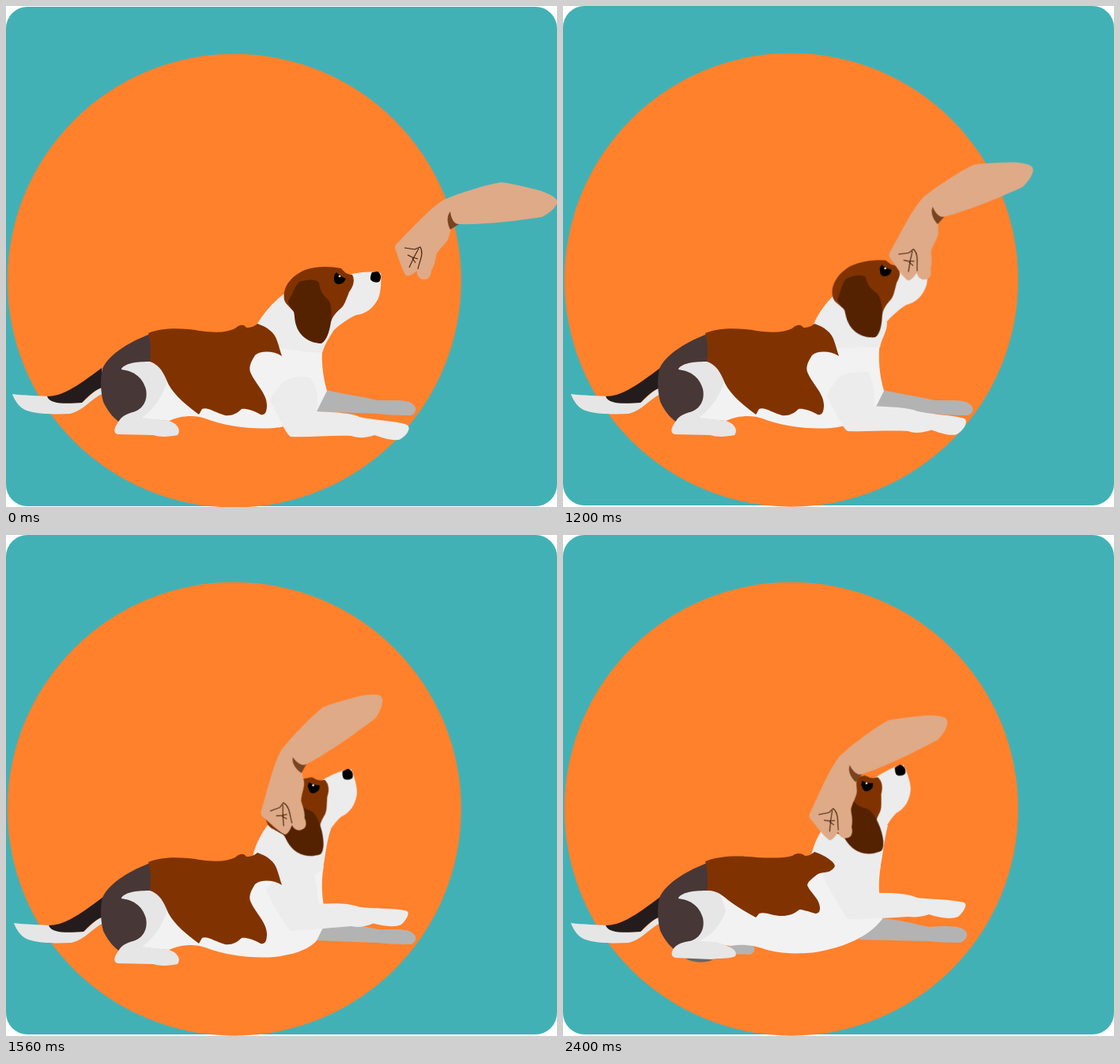
Recreate the animation shown at these times as an HTML page. Size 697 by 634 pixels, loop 3600 ms.

```html
<!DOCTYPE html>
<html lang="en">
<head>
<meta charset="utf-8">
<title>Dog training</title>
<style>
html, body { margin: 0; width: 100%; height: 100%; overflow: hidden; background: #fff; }
svg { display: block; width: 100%; height: 100%; }

/* Poses are held; steps(2) adds one halfway pose between two keyframes. */
.backdrop, .tail, .neck, .leg, .far-leg, .belly, .thigh, .coat, .head, .ear, .arm, .under, .bubble {
  animation: 3.6s step-end infinite;
}
.backdrop { animation-name: backdrop; }
.tail { animation-name: tail; }
.neck { animation-name: neck; }
.leg { animation-name: leg; }
.far-leg { animation-name: far-leg; }
.belly { animation-name: belly; }
.thigh { animation-name: thigh; }
.coat { animation-name: coat; }
.head { animation-name: head; transform-origin: 422px 345px; }
.ear { animation-name: ear; transform-origin: 385px 350px; }
.arm { animation-name: arm; transform-origin: 492px 303px; }
.under { animation-name: under; }
.bubble { animation-name: bubble; }

@keyframes backdrop {
  0% { transform: translate(0, 1px); }
  30%, 100% { transform: none; }
}
@keyframes tail {
  0% { transform: translate(-2px, 0); }
  30%, 100% { transform: none; }
}
@keyframes head {
  0% { transform: translate(0, 0) rotate(0deg); }
  30% { transform: translate(-14px, -10px) rotate(-7deg); }
  40% { transform: translate(-28px, -23px) rotate(-15deg); animation-timing-function: steps(2); }
  46.666%, 100% { transform: translate(-37px, -28px) rotate(-22deg); }
}
@keyframes ear {
  0% { transform: translate(0, 0) rotate(0deg); }
  40% { transform: translate(0, 0) rotate(0deg); animation-timing-function: steps(2); }
  46.666%, 100% { transform: translate(1px, 3px) rotate(-6deg); }
}
@keyframes arm {
  0% { transform: translate(0, 0) rotate(0deg); }
  30% { transform: translate(-43px, 0) rotate(-8deg); animation-timing-function: steps(2); }
  36.666% { transform: translate(-117px, 23px) rotate(-23.6deg); }
  40% { transform: translate(-159px, 47px) rotate(-38deg); animation-timing-function: steps(2); }
  46.666%, 100% { transform: translate(-181px, 52px) rotate(-19.5deg); }
}
@keyframes neck {
  0% { d: path("M316,405 C325,390 337,375 352,364 L414,411 C412,416 404,425 400,439 C380,438 360,435 345,432 L330,410Z"); }
  30% { d: path("M316,405 C322,390 332,376 343,366 L410,400 C410,413 403,420 401,432 C380,432 360,433 347,433 L330,410Z"); }
  40% {
    d: path("M311,405 C314,390 324,374 334,362 L411,377 C403,395 404,408 401,419 C380,423 360,425 346,428 L330,410Z");
    animation-timing-function: steps(2);
  }
  46.666%, 100% { d: path("M314,406 C317,392 322,382 328,372 L411,367 C405,390 404,415 399,430 C380,450 360,470 345,455 L329,430Z"); }
}
@keyframes leg {
  0% { d: path("M345,483 C350,472 365,468 385,470 C395,485 395,500 393,513 C420,514 440,516 447,520 C470,525 495,525 507,530 C514,534 506,545 497,549 C485,550 475,546 466,543 C455,547 445,547 437,544 C410,543 385,546 360,545 C353,540 345,520 334,500 C335,492 340,488 345,483Z"); }
  30% {
    d: path("M345,483 C350,472 365,468 385,470 C395,485 395,500 393,513 C420,514 440,516 447,520 C470,525 495,525 507,530 C514,534 506,545 497,549 C485,550 475,546 466,543 C455,547 445,547 437,544 C410,543 385,546 360,545 C353,540 345,520 334,500 C335,492 340,488 345,483Z");
    animation-timing-function: steps(2);
  }
  36.666% { d: path("M343,470 C350,457 365,456 387,457 C394,475 393,488 394,500 C420,500 440,502 447,505 C470,510 495,511 508,514 C514,518 506,532 497,536 C487,538 475,533 466,530 C455,533 445,536 437,532 C410,530 385,532 360,531 C353,527 345,508 334,488 C335,482 338,477 343,470Z"); }
  40% {
    d: path("M343,450 C348,438 365,440 381,440 C390,455 390,470 392,481 C410,479 430,478 444,482 C465,486 490,482 505,486 C512,488 506,497 500,503 C490,508 475,504 466,503 C455,508 445,511 437,507 C420,508 385,514 360,516 C353,513 340,490 329,468 C332,462 338,456 343,450Z");
    animation-timing-function: steps(2);
  }
  46.666%, 100% { d: path("M329,430 C345,420 365,420 399,420 C398,435 398,445 400,453 C415,453 435,453 448,459 C465,461 490,461 507,465 C513,467 506,478 500,483 C490,487 475,484 463,480 C455,483 445,484 437,483 C410,485 385,486 360,486 C353,475 340,455 329,432 C329,431 329,431 329,430Z"); }
}
@keyframes far-leg {
  0%, 40% { d: path("M406,486 C420,490 450,494 470,499 C490,499 505,498 512,502 C521,507 520,515 512,518 C490,518 480,517 470,516 L390,513Z"); }
  40% { animation-timing-function: steps(2); }
  46.666%, 100% { d: path("M404,485 C425,487 445,492 463,496 C480,495 495,494 505,498 C514,503 513,510 503,516 C490,516 475,515 460,514 L374,512Z"); }
}
@keyframes belly {
  0%, 40% { d: path("M183,450 L172,522 L206,525 C220,518 240,517 252,522 C280,533 325,538 352,532 C372,529 388,520 393,513 L406,487 C401,470 397,445 402,418 L300,425Z"); }
  40% { animation-timing-function: steps(2); }
  46.666%, 100% { d: path("M183,450 L172,514 L212,520 C228,517 245,520 258,525 C280,531 310,530 325,527 C355,521 385,510 404,486 L402,470 C400,460 398,440 402,418 L300,425Z"); }
}
@keyframes thigh {
  0%, 40% { d: path("M146,459 C152,451 168,450 183,450 C192,454 199,464 204,474 C200,490 188,510 172,521 L206,525 C217,528 222,537 217,543 C208,545 195,546 186,543 L141,542 C135,540 137,533 143,525 C148,517 155,516 163,513 C175,508 179,497 176,484 C171,468 160,462 146,461Z"); }
  40% { animation-timing-function: steps(2); }
  46.666%, 100% { d: path("M146,459 C152,451 168,450 183,450 C200,450 199,454 206,476 C200,490 192,505 172,514 L193,515 C212,520 222,526 218,533 C210,537 195,535 188,537 L142,535 C135,533 137,525 143,520 C148,516 155,515 163,513 C175,508 179,497 176,484 C171,468 160,462 146,461Z"); }
}
@keyframes coat {
  0%, 40% { d: path("M180,414 C200,406 225,408 245,411 C265,414 280,413 290,408 C296,402 302,403 304,407 C310,407 315,405 318,402 C330,406 340,413 343,424 C346,432 347,438 349,443 C338,436 322,436 315,442 C310,450 307,456 309,463 C315,478 330,490 330,505 C330,515 327,518 322,517 C312,511 302,509 298,510 C292,516 285,519 277,518 C265,515 255,507 248,510 L244,517 C222,501 208,487 203,473 C197,459 191,453 182,450 C184,438 183,425 180,414Z"); }
  40% { animation-timing-function: steps(2); }
  46.666%, 100% { d: path("M180,413 C200,405 225,406 245,408 C265,409 280,409 290,406 C296,401 303,403 306,406 C311,406 315,404 318,401 C328,404 338,410 342,415 C345,419 344,420 341,423 C335,429 328,425 321,430 C314,436 310,438 309,443 C312,452 325,460 325,472 C325,478 322,479 319,479 C310,476 302,474 299,474 C292,480 285,482 277,482 C265,482 255,476 248,479 L244,484 C228,475 214,467 204,458 C195,451 190,450 182,450 C184,438 183,425 180,413Z"); }
}
@keyframes under {
  0% { visibility: hidden; }
  46.666%, 100% { visibility: visible; }
}
@keyframes bubble {
  0% { visibility: hidden; }
  46.666% { visibility: visible; }
  66.666%, 100% { visibility: hidden; }
}
</style>
</head>
<body>
<svg viewBox="0 0 697 634">
  <g class="backdrop">
    <rect width="697" height="632" rx="27" fill="#42b1b6"/>
    <circle cx="288.8" cy="346.7" r="287" fill="#ff812c"/>
  </g>

  <g class="tail">
    <path fill="#e6e6e6" d="M10,491 C25,493 45,493 56,494 C58,503 80,503 98,502 C106,496 112,487 124,482 L123,491 C110,497 100,512 83,516 C60,517 30,517 20,507 C14,501 11,494 10,491Z"/>
    <path fill="#241c1c" d="M54,494 C72,494 90,483 123,458 L123,483 C112,487 104,496 98,502 C80,503 58,505 54,494Z"/>
  </g>
  <path fill="#483737" d="M183,415 C160,423 130,440 122,459 C118,475 121,497 124,503 C130,515 138,523 143,526 L160,515 C175,510 180,500 177,485 L183,452Z"/>
  <g class="under">
    <path fill="#b3b3b3" d="M210,519 L236,518 C244,520 245,528 236,531 L215,530Z"/>
    <path fill="#666" d="M155,536 C168,532 182,532 191,536 C185,542 165,542 155,536Z"/>
  </g>
  <path class="far-leg" fill="#b3b3b3"/>
  <path class="belly" fill="#f2f2f2"/>
  <path class="thigh" fill="#e6e6e6"/>
  <path fill="#483737" d="M146,460 C160,462 172,468 177,485 C180,500 172,511 160,514 L140,510 L130,480Z"/>
  <path class="neck" fill="#ececec"/>
  <path class="leg" fill="#ececec"/>
  <path class="coat" fill="#803300"/>

  <g class="head">
    <path fill="#ececec" d="M434,340 C445,337 465,335 474,338 C475,350 474,362 471,370 C465,382 455,390 443,391 C430,397 420,405 413,412 L400,425 L385,395 L400,345Z"/>
    <path fill="#803300" d="M352,372 C349,355 362,341 378,334 C392,329 410,329 424,332 C428,337 432,340 438,340 C442,348 439,355 434,362 C430,372 428,380 422,384 C415,390 412,396 411,400 L380,400 L365,388 L354,376Z"/>
    <path class="ear" fill="#552200" d="M357,373 C362,366 364,356 371,349 C380,346 392,345 396,350 C397,358 399,364 407,371 C413,378 412,390 411,400 C409,412 406,423 399,427 C385,427 371,418 367,404 C364,395 366,387 362,384 C358,378 357,376 357,373Z"/>
    <path d="M415,341 L418,337 C421,340 425,343 430,345 L427,350 C422,353 416,353 415,347Z"/>
    <path d="M463,337 L470,336 C475,339 475,345 472,349 C467,351 461,348 461,345 C461,341 462,339 463,337Z"/>
  </g>

  <g class="arm">
    <path fill="#deaa87" d="M697,246 C694,240 680,234 665,231 C650,227 635,224 626,223 C605,227 575,236 554,245 C535,257 515,280 497,298 C492,302 491,305 493,309 C497,320 500,332 506,341 C510,343 516,338 520,335 C519,342 524,346 529,346 C535,347 538,340 538,335 C544,325 543,318 545,313 C550,305 558,300 560,293 C562,286 562,280 571,276 C605,277 645,272 678,267 C688,262 694,256 697,250Z"/>
    <path fill="#784421" d="M562,260 C557,266 558,275 562,283 L573,276 C566,276 563,268 562,260Z"/>
    <path fill="none" stroke="#40200c" stroke-width="1.1" d="M504,306 L517,308 L524,305 C529,313 523,323 521,333 M522,307 L516,318 L510,331 M508,315 L514,318 L521,320 M514,319 L518,325"/>
  </g>
  <g class="head"><circle cx="422" cy="342" r="1.3" fill="#fff"/></g>

  <g class="bubble">
    <path fill="#fff" d="M661,115 C671,127 682,137 697,138 C684,139 674,141 662,143Z"/>
    <g transform="translate(560 109.7) rotate(-8)">
      <rect x="-102" y="-71" width="204" height="142" rx="25" fill="#e9e9e9"/>
      <path fill="#fff" d="M-68,-71 H77 A25,25 0 0 1 102,-46 V32 A25,25 0 0 1 77,57 H-68 A20,20 0 0 1 -88,37 V-49 A22,22 0 0 1 -68,-71Z"/>
      <text x=".5" y="11.5" text-anchor="middle" font-family="'Liberation Serif', serif" font-size="50" letter-spacing=".8" stroke="#fff" stroke-width=".7">BANG</text>
    </g>
  </g>
</svg>
</body>
</html>
```
